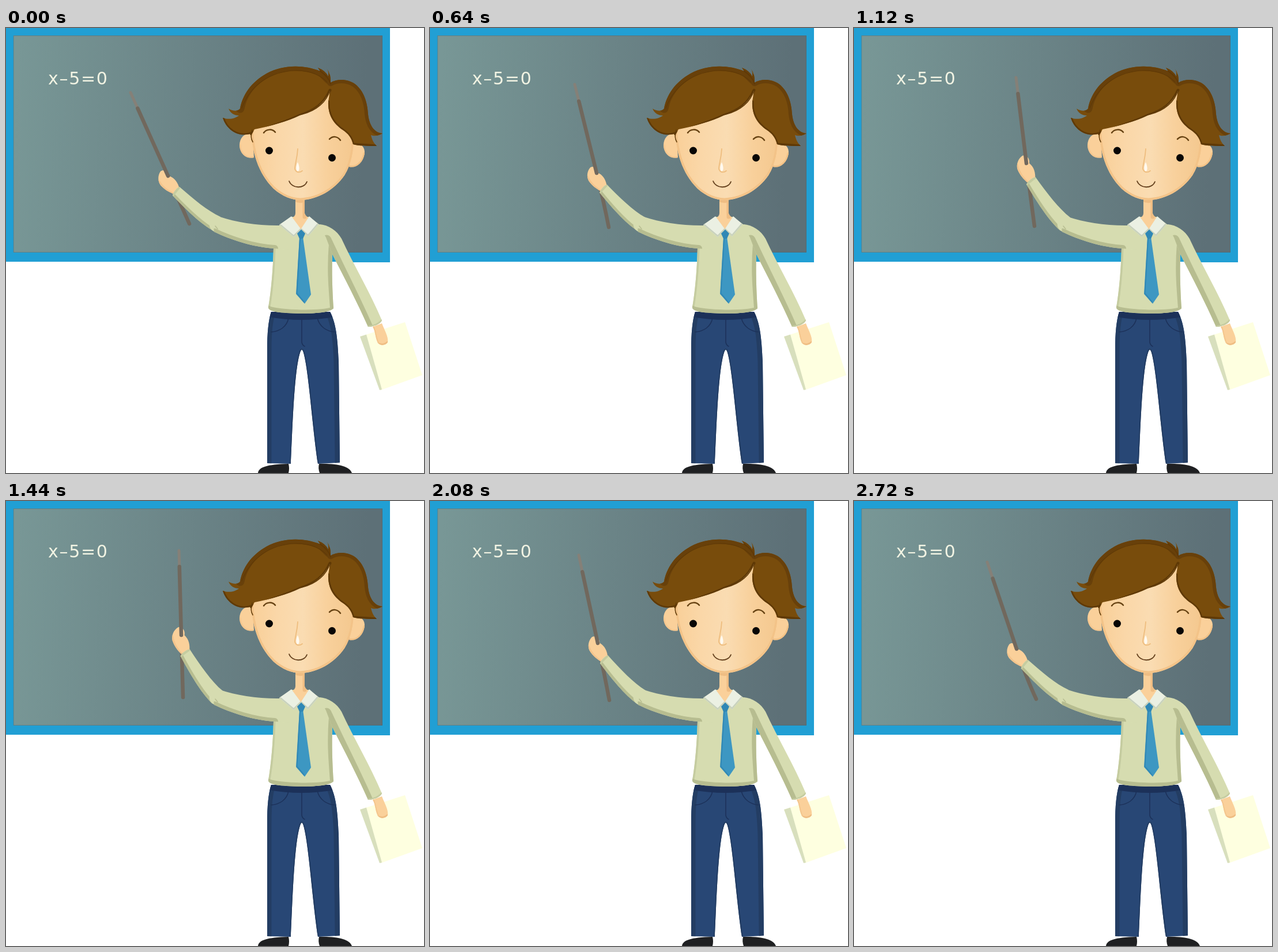
These frames come from a looping animation (725 px wide and 773 px high, 2880 ms). An HTML page with a canvas:

```html
<!DOCTYPE html>
<html lang="en">
<head>
<meta charset="utf-8">
<title>Teacher at the board</title>
<style>
  html, body { margin: 0; width: 100%; height: 100%; overflow: hidden; background: #fff; }
  canvas, svg { position: absolute; left: 0; top: 0; display: block; }
  text { font: 30px "DejaVu Sans", Verdana, sans-serif; letter-spacing: 1.7px; fill: #f1f3e3; }
</style>
</head>
<body>
<canvas id="stage" width="725" height="773"></canvas>
<svg width="725" height="773"><text x="73" y="98">x–5=0</text></svg>
<script>
const ctx = document.getElementById('stage').getContext('2d');
const STEP = 160, LAST = 9;
const ELBOW = [366, 341], WRIST = [295, 282];

const SHIRT = '#d6dcb0', SHADE = '#b7bd90', RIM = '#c5cca0';
const SKIN = '#fad09a', SKIN_DARK = '#efbd83';
const HAIR = '#784c0c', HAIR_RIM = '#68400a', HAIR_DARK = '#5f3906';
const PANTS = '#284775', PANTS_DARK = '#233d63', SEAM = '#1c3159';
const STICK = '#71685d', STICK_TIP = '#858078';

// Swing of the pointer: tip, grip and lower end at each step
const POSES = [
  [216, 112, 281, 257, 318, 340],
  [231, 106, 282, 257, 316, 344],
  [238, 103, 285, 256, 314, 345],
  [245, 100, 287, 254, 312, 346],
  [251, 98, 289, 252, 310, 346],
  [258, 94, 291, 247, 311, 346],
  [268, 88, 294, 241, 312, 345],
  [281, 86, 299, 235, 313, 344],
  [290, 86, 302, 234, 310, 343],
  [300, 86, 304, 233, 307, 341]
];

function fill(d, color) {
  const p = new Path2D(d);
  ctx.fillStyle = color;
  ctx.fill(p);
  return p;
}

function line(d, color, width) {
  ctx.strokeStyle = color;
  ctx.lineWidth = width;
  ctx.stroke(new Path2D(d));
}

function disc(x, y, r, color) {
  ctx.fillStyle = color;
  ctx.beginPath();
  ctx.arc(x, y, r, 0, 7);
  ctx.fill();
}

// Shape with strokes that stay inside its edge
function shape(d, color, ...strokes) {
  const p = fill(d, color);
  ctx.save();
  ctx.clip(p);
  for (const s of strokes) line(...s);
  ctx.restore();
}

function ramp(x0, y0, x1, y1, ...colors) {
  const g = ctx.createLinearGradient(x0, y0, x1, y1);
  colors.forEach((c, i) => g.addColorStop(i / (colors.length - 1), c));
  return g;
}

function turnAbout([x, y], angle, size = 1) {
  ctx.translate(x, y);
  ctx.rotate(angle);
  ctx.scale(size, size);
  ctx.translate(-x, -y);
}

function board() {
  ctx.fillStyle = '#fff';
  ctx.fillRect(0, 0, 725, 773);
  fill('M0 0H666V407H600V406H0Z', '#219fd4');
  ctx.fillStyle = ramp(13, 185, 620, 215, '#789796', '#5d7077');
  ctx.fillRect(13, 13, 640, 377);
  ctx.strokeStyle = 'rgba(70, 95, 105, 0.4)';
  ctx.lineWidth = 1;
  ctx.strokeRect(13.5, 13.5, 639, 376);
}

function lowerStick([tx, ty, gx, gy, bx, by]) {
  const k = 55 / Math.hypot(gx - tx, gy - ty);
  const cx = gx + (gx - tx) * k, cy = gy + (gy - ty) * k;
  line(`M${gx} ${gy}Q${cx} ${cy} ${bx} ${by}`, STICK, 6.5);
}

function upperStick([tx, ty, gx, gy]) {
  const mx = tx + (gx - tx) * 0.19, my = ty + (gy - ty) * 0.19;
  line(`M${tx} ${ty}L${mx} ${my}`, STICK_TIP, 5);
  line(`M${mx} ${my}L${gx} ${gy}`, STICK, 6.5);
}

function forearm(pose) {
  const vec = p => [p[2] - ELBOW[0], p[3] - ELBOW[1]];
  const a = vec(POSES[0]), b = vec(pose);
  const turn = Math.atan2(b[1], b[0]) - Math.atan2(a[1], a[0]);
  ctx.save();
  turnAbout(ELBOW, turn, Math.hypot(...b) / Math.hypot(...a));
  ctx.save();
  turnAbout(WRIST, turn * 0.45);
  shape('M268 249C263 256 263 266 268 273C275 281 283 285 290 288L300 276C296 264 289 259 283 257C282 250 274 244 268 249Z',
    SKIN, ['M264 266C271 279 282 284 292 290', '#f3c48c', 5]);
  ctx.restore();
  shape('M372 328C350 318 325 297 301 276C296 277 290 285 289 291C310 313 338 341 361 353L374 350Z',
    SHIRT, ['M289 291C310 313 338 341 361 353', SHADE, 9], ['M301 276L289 291', RIM, 4]);
  ctx.restore();
}

function upperArm() {
  disc(...ELBOW, 13.3, SHIRT);
  shape('M371 328C400 338 440 344 478 343L490 385L466 383C430 381 390 368 361 354C359 345 363 333 371 328Z',
    SHIRT, ['M361 354C390 368 430 381 466 383', SHADE, 12]);
  line('M363 344L367 349', SHADE, 1.5);
}

function legs() {
  fill('M437 773C438 763 452 758 490 757Q492 765 490 773Z', '#1f2022');
  fill('M543 757C575 756 596 761 600 773H544Q541 765 543 757Z', '#1f2022');
  shape('M460 493C455 508 453 530 453 560V756L494 757C497 690 500 595 510 564Q513 554 516 564C525 595 531 690 541 757L579 755L577 580C575 535 572 512 562 493Z',
    PANTS,
    ['M460 493C455 508 453 530 453 560V756', PANTS_DARK, 15],
    ['M562 493C572 512 575 535 577 580L579 755', PANTS_DARK, 17],
    ['M494 757C497 690 500 595 510 564Q513 554 516 564C525 595 531 690 541 757', PANTS_DARK, 4],
    ['M457 496Q512 506 568 496', SEAM, 12]);
  line('M490 504C487 519 475 527 460 528M540 504C544 519 556 527 570 528', SEAM, 1.5);
  line('M513 503V546Q514 551 518 553', SEAM, 1.5);
}

function torso() {
  shape('M475 341L495 328H526L543 341C556 343 563 350 566 392C565 425 566 455 568 487C562 493 545 496 510 496C475 495 455 493 455 485C460 455 463 420 464 382Z',
    SHIRT,
    ['M464 382C463 420 460 455 455 485', RIM, 7],
    ['M455 487C470 495 555 497 568 488', SHADE, 9],
    ['M566 375C562 425 566 455 568 487', SHADE, 12]);
  shape('M543 341C560 342 574 352 582 366C602 410 632 460 652 508C649 515 637 519 628 519C610 478 586 432 566 393L555 364Z',
    SHIRT, ['M628 520C610 478 586 432 556 368', SHADE, 17], ['M628 519Q643 518 652 508', RIM, 4]);
}

function paper() {
  fill('M614 536L692 511L722 603L650 629Z', '#feffe0');
  fill('M614 536L625 532.5L652 628L648 629Z', '#d8dfbd');
  shape('M636 519L652 513C656 524 664 537 662 546C658 552 649 552 645 547C640 537 641 527 636 519Z',
    SKIN, ['M645 548Q653 553 662 546', SKIN_DARK, 4], ['M636 518C641 527 640 537 645 547', '#f4c68e', 4]);
}

function neck() {
  shape('M502 292H518V322Q520 328 528 331L511 352L492 332Q502 328 502 322Z',
    SKIN, ['M502 298Q511 303 518 297', SKIN_DARK, 7], ['M518 296V328', SKIN_DARK, 7]);
  const edge = '#c9d2bd';
  shape('M474 342L495 327L512 350L499 363Z', '#ebf0e3', ['M474 342L499 363L512 350', edge, 5]);
  shape('M526 327L542 341L524 362L511 350Z', '#ebf0e3', ['M542 341L524 362L511 350', edge, 5]);
}

function tie() {
  fill('M509 363H515L529 463L518 479L503 462Z', '#3d97c2');
  line('M510 366L504.5 461L517 476', '#3188b5', 2);
  fill('M505 357L512 350L519 357L515 366H509Z', '#2f87b5');
}

function face() {
  shape('M428 184C417 181 405 188 405 204C406 220 418 228 430 225Z', SKIN,
    ['M405 204C406 220 418 228 430 225', '#f5c78f', 5]);
  shape('M600 201C613 198 623 205 622 218C619 235 607 244 595 241Z', SKIN,
    ['M622 218C619 235 607 244 595 241', '#f3c286', 5]);
  const jaw = 'C426 215 437 252 464 279C480 293 496 299 511 299C540 298 569 282 587 256C599 237 603 212 603 190';
  shape('M425 172' + jaw + 'L575 100H530L440 160Z',
    ramp(426, 0, 603, 0, '#f9cf98', '#fad7a8', '#fadcb2', '#f8d09b', '#f4c88f'),
    ['M425 172' + jaw, '#f3c388', 7]);
  line('M447 182C452 175 462 175 467 181M561 193C567 187 575 188 580 195', '#674313', 2.5);
  disc(456.5, 213, 6.5, '#080605');
  disc(565.5, 225.5, 6.5, '#080605');
  line('M506 210C505 228 501 236 501 245C503 251 509 252 514 248', '#eebd7e', 1.8);
  fill('M506 233C502 241 503 248 506 249C510 248 509 240 506 233Z', '#fffaf0');
  line('M491 266C496 279 517 280 522 267', '#66421f', 1.8);
}

function hair() {
  shape('M376 156C387 160 398 157 404 152C396 152 389 148 386 140C394 145 402 145 406 140C410 117 425 94 452 79C480 64 515 63 545 75L541 69Q554 74 559 84Q560 77 557 71Q564 81 563 95C574 88 592 88 605 97C621 109 627 130 628 150C630 168 638 182 653 183C645 188 638 188 633 186C635 195 638 200 643 205C628 205 612 205 602 202C599 190 594 184 584 177C568 166 558 151 559 128L562 108C552 131 537 143 509 152C488 162 460 170 431 176L425 187L423 184C400 190 382 175 376 156Z',
    HAIR,
    ['M406 140C410 117 425 94 452 79C480 64 515 63 545 75L560 90', HAIR_RIM, 15],
    ['M409 139C425 97 460 76 500 74C530 73 550 84 561 99', HAIR_DARK, 1.2],
    ['M563 95C574 88 592 88 605 97C621 109 627 130 628 150C630 168 638 182 653 183', HAIR_RIM, 12],
    ['M423 184C460 171 488 162 509 152C537 143 552 131 562 108', HAIR_DARK, 5],
    ['M376 156C382 175 400 190 423 184', HAIR_DARK, 5],
    ['M559 128C558 151 568 166 584 177C594 184 599 190 602 202L643 205', HAIR_DARK, 5]);
  line('M562 107C557 128 538 144 513 150', HAIR_DARK, 1.5);
  line('M563 97Q559 84 545 75', HAIR_DARK, 2);
  line('M427 177Q423 190 428 198', HAIR_DARK, 1.5);
}

function draw(now) {
  const n = Math.floor(now / STEP) % (2 * LAST);
  const pose = POSES[LAST - Math.abs(LAST - n)];
  ctx.lineCap = ctx.lineJoin = 'round';
  board();
  lowerStick(pose);
  forearm(pose);
  upperStick(pose);
  legs();
  torso();
  upperArm();
  paper();
  neck();
  tie();
  face();
  hair();
}

const start = performance.now();
function tick() {
  draw(performance.now() - start);
  requestAnimationFrame(tick);
}
tick();
</script>
</body>
</html>
```
